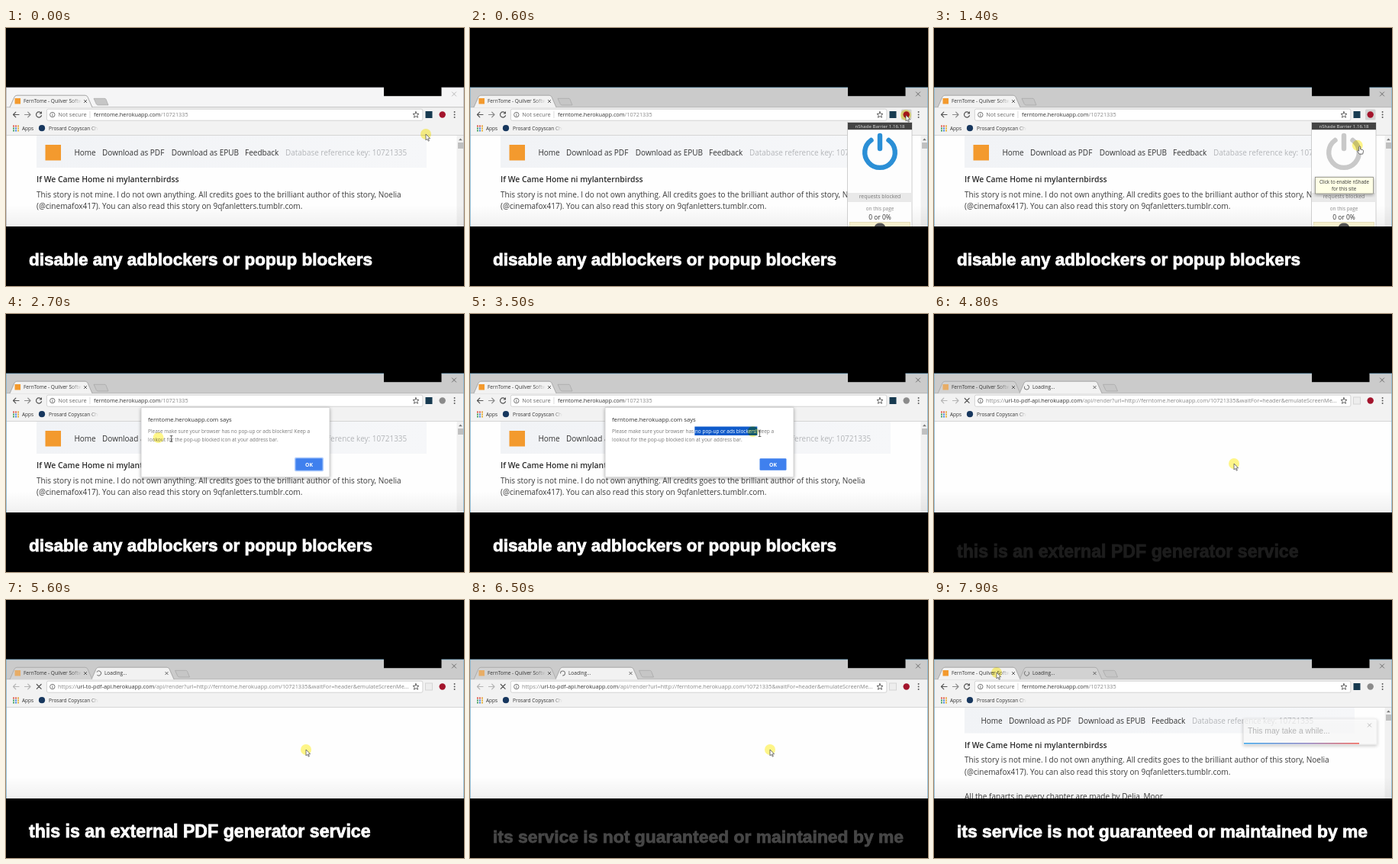
Write an HTML page that moves like this. It is 600 px wide and 338 px high and loops after 8 s.

```html
<!DOCTYPE html>
<html lang="en">
<head>
<meta charset="utf-8">
<style>
html, body { margin: 0; width: 100%; height: 100%; overflow: hidden; background: #000; }
svg { display: block; width: 100vw; height: 100vh; font-family: "Open Sans", "Noto Sans", sans-serif; white-space: pre; }
.caption { font-family: "Liberation Sans", Arial, sans-serif; font-weight: 700; fill: #fff; stroke: #fff; stroke-width: .8; }
.arial { font-family: "Liberation Sans", Arial, sans-serif; }
.line { fill: none; stroke-linecap: round; stroke-linejoin: round; }
#halo { mix-blend-mode: multiply; }
</style>
</head>
<body>
<svg id="stage" viewBox="0 0 600 338"></svg>
<script>
const LOOP = 8000;
const stage = document.getElementById('stage');

const text = (x, y, size, str, fill = '#333', extra = '') =>
  `<text x="${x}" y="${y}" font-size="${size}" fill="${fill}" ${extra}>${str}</text>`;
const rect = (x, y, w, h, fill, extra = '') =>
  `<rect x="${x}" y="${y}" width="${w}" height="${h}" fill="${fill}" ${extra}/>`;
const circle = (x, y, r, fill, extra = '') =>
  `<circle cx="${x}" cy="${y}" r="${r}" fill="${fill}" ${extra}/>`;
const line = (d, stroke, width = 1, extra = '') =>
  `<path class="line" d="${d}" stroke="${stroke}" stroke-width="${width}" ${extra}/>`;
const cross = (x, y, r, stroke, width = 1, extra = '') =>
  line(`M${x - r} ${y - r}L${x + r} ${y + r}M${x + r} ${y - r}L${x - r} ${y + r}`, stroke, width, extra);
const group = (id, body, extra = '') => `<g id="${id}" ${extra}>${body}</g>`;
const fade = (id, x1, x2, color) =>
  `<linearGradient id="${id}" gradientUnits="userSpaceOnUse" x1="${x1}" x2="${x2}" y1="0" y2="0">
    <stop stop-color="${color}"/><stop offset="1" stop-color="${color}" stop-opacity="0"/></linearGradient>`;

const site = 'ferntome.herokuapp.com';
const bookKey = '10721335';
const notice = 'Please make sure your browser has no pop-up or ads blockers! Keep a';
const selected = 'no pop-up or ads blockers!';

const defs = `<defs>
  ${fade('fadeTab', 84, 99, '#333')}${fade('fadeMark', 109, 121, '#333')}
  <linearGradient id="floor" x2="0" y2="1"><stop stop-opacity="0"/><stop offset="1" stop-opacity=".055"/></linearGradient>
  <linearGradient id="nav"><stop stop-color="#f1f3f6"/><stop offset="1" stop-color="#f6f7f9"/></linearGradient>
  <linearGradient id="bar"><stop stop-color="#2f9fe8"/><stop offset=".55" stop-color="#8a7fc0"/><stop offset="1" stop-color="#ee5a4f"/></linearGradient>
  <filter id="shadow" x="-10%" y="-10%" width="120%" height="130%"><feDropShadow dx="0" dy="1.5" stdDeviation="2" flood-opacity=".35"/></filter>
  <clipPath id="view">${rect(0, 141, 600, 119, '#fff')}</clipPath>
  <clipPath id="popClip">${rect(494, 123, 86, 137, '#fff')}</clipPath>
  <clipPath id="pick"><rect id="pickBox" y="147.5" height="11.5"/></clipPath>
</defs>`;

const tabShape = x =>
  `M${x} 104L${x + 6} 90.5Q${x + 7} 88.3 ${x + 9} 88.3H${x + 99}Q${x + 101} 88.3 ${x + 102} 90.5L${x + 108} 104`;
const tab = (id, x) => `<path id="${id}" d="${tabShape(x)}" stroke="#a5a5a5" stroke-width=".8"/>`;
const newTab = group('newTab',
  `<path d="M115 92.3H129Q130.5 92.3 131 93.5L134 101H120.5Q119 101 118.3 99.6Z" fill="#c6c6c6" stroke="#a5a5a5" stroke-width=".7"/>`);

const arrow = (id, tip, tail) => {
  const back = tail > tip ? 3.3 : -3.3;
  return `<path id="${id}" class="line" stroke-width="1.2" d="M${tail} 113.5H${tip}M${tip + back} 110.2L${tip} 113.5L${tip + back} 116.8"/>`;
};

const appDots = [...Array(9).keys()].map(i =>
  rect(9 + (i % 3) * 3, 127.5 + Math.floor(i / 3) * 3, 2, 2,
    ['#e05a4c', '#e05a4c', '#e8a33a', '#4ca564', '#4a86e0', '#e8b33a', '#4ca564', '#4a86e0', '#e8b33a'][i])).join('');

const chrome =
  rect(0, 78, 600, 182, '#fefefe') + rect(0, 78, 600, 26, '#cbcbcb', 'id="strip"') + rect(0, 104, 600, 37, '#f2f2f2') +
  rect(0, 103.4, 600, .8, '#b2b2b2') + rect(0, 140.2, 600, .8, '#cfcfcf') + newTab +
  tab('tabB', 112) + tab('tabA', 5) + `<use id="tabTop"/>` +
  rect(11.5, 92, 7.5, 7.5, '#f39a2e', 'id="favicon"') +
  text(23, 98.4, 6.5, 'FernTome - Quilver Softw', 'url(#fadeTab)') + cross(104, 96, 1.7, '#555', .9) +
  group('loadTab', text(129, 98.4, 6.5, 'Loading...') + cross(210.5, 96, 1.7, '#555', .9) +
    line('M0 -3A3 3 0 1 0 3 0', '#777', 1, 'id="spinner"')) +
  rect(495, 77, 75.5, 12.2, '#000') + cross(587, 86.5, 2.6, 'inherit', .8, 'id="close"') +
  arrow('back', 9.5, 17) + arrow('forward', 32, 24.5) +
  group('reload', line('M46 111.3A3.6 3.6 0 1 0 46.5 114.7', '#555', 1.2) + `<path d="M47 109V112.6H43.4Z" fill="#555"/>`) +
  group('stop', cross(43.2, 113.4, 2.9, '#555', 1.2)) +
  rect(53.4, 106.2, 492.5, 15, '#fff', 'rx="2" stroke="#cacaca" stroke-width=".8"') +
  circle(60.8, 113.6, 3.2, 'none', 'stroke="#666" stroke-width=".9"') + rect(60.4, 113.1, .9, 2.5, '#666') + rect(60.4, 111.6, .9, .9, '#666') +
  group('urlSite', text(68.2, 116.3, 7.45, 'Not secure', '#666') + rect(109.6, 109, .7, 9, '#ccc') +
    text(115, 116.3, 7.3, `${site}<tspan fill="#888">/${bookKey}</tspan>`)) +
  group('urlPdf', text(68, 116.3, 7.33,
    `https://<tspan fill="#333">url-to-pdf-api.herokuapp.com</tspan>/api/render?url=http://${site}/${bookKey}&amp;waitFor=header&amp;emulateScreenMe...`, '#888')) +
  `<path class="line" stroke="#555" stroke-width=".9" d="M537 109.6L538.1 112.3L541 112.5L538.8 114.4L539.5 117.3L537 115.7L534.5 117.3L535.2 114.4L533 112.5L535.9 112.3Z"/>` +
  `<rect id="extA" x="549.5" y="109" width="9" height="9"/>` +
  rect(565, 106.5, 13.5, 14, '#d3d3d3', 'id="extPress" rx="1.5"') + circle(571.7, 113.5, 4.2, '#a3142c', 'id="extB"') +
  [110, 113.5, 117].map(y => circle(587.6, y, .95, '#555')).join('') +
  appDots + text(21, 134, 6.5, 'Apps') + circle(47, 131.2, 4.1, '#17375e') +
  text(56, 134, 6.5, 'Prosard Copyscan Che', 'url(#fadeMark)');

const navLinks = [[89.4, 'Home'], [126, 'Download as PDF'], [216.8, 'Download as EPUB'], [313, 'Feedback']]
  .map(([x, label]) => text(x, 166.6, 10, label)).join('');
const page = group('page',
  `<rect id="navBar" x="40" y="141" width="511" fill="url(#nav)"/>` +
  group('logo', rect(51.5, 153, 20.5, 20.5, '#f39a2e')) +
  group('links', navLinks + text(366, 166.6, 9.95, `Database reference key: ${bookKey}`, '#b4b6b9')) +
  group('story',
    text(40, 202.3, 10.4, 'If We Came Home ni mylanternbirdss', '#2b2b2b', 'font-weight="600"') +
    text(40, 221.6, 10.05, 'This story is not mine. I do not own anything. All credits goes to the brilliant author of this story, Noelia', '#3a3a3a') +
    text(40, 237.4, 10.05, '(@cinemafox417). You can also read this story on 9qfanletters.tumblr.com.', '#3a3a3a') +
    text(40, 270, 10.05, 'All the fanarts in every chapter are made by Delia_Moor', '#3a3a3a')) +
  rect(590.5, 141, 9.5, 119, '#f1f1f1') + rect(592, 150, 7, 8, '#c0c0c0') +
  `<path d="M593 147.3L595.4 144.5L597.8 147.3Z" fill="#777"/>`, 'clip-path="url(#view)"');

const popup = group('popup',
  rect(494.5, 123.7, 84.5, 137, '#fdfdfd', 'stroke="#bbb" stroke-width=".7"') + rect(495, 124, 84, 9.2, '#444') +
  text(537, 130.9, 6.1, 'nShade Barrier 1.16.18', '#ddd', 'text-anchor="middle"') +
  group('power', line('M525.5 147A19.8 19.8 0 1 0 548.5 147', 'inherit', 6.4) + line('M537 141V158', 'inherit', 6.4)) +
  rect(495, 216, 84, 12, '#e9e9e9') +
  text(537, 223, 6.9, 'requests blocked', '#777', 'text-anchor="middle"') +
  text(537, 239, 6.4, 'on this page', '#888', 'text-anchor="middle"') +
  text(537, 250.6, 8.5, '0 or 0%', '#333', 'text-anchor="middle"') +
  rect(497.5, 254.5, 79, 6, '#f7f0cd', 'stroke="#d8cfa0" stroke-width=".6"') +
  `<path d="M530 260.5A7 5 0 0 1 544 260.5Z" fill="#555"/>` +
  group('tip', rect(499.5, 195.5, 76, 21.5, '#ffffe6', 'stroke="#8b8b80" stroke-width=".8" filter="url(#shadow)"') +
    text(537.5, 204.4, 6.2, 'Click to enable nShade', '#333', 'text-anchor="middle"') +
    text(537, 213, 6.2, 'for this site', '#333', 'text-anchor="middle"')), 'clip-path="url(#popClip)"');

const dialog = group('dialog',
  rect(177, 122.3, 247, 91.5, '#fff', 'rx="1" stroke="#bbb" stroke-width=".6" filter="url(#shadow)"') +
  text(186, 141, 7.7, `${site} says`) +
  text(186, 156, 6.5, notice, '#777', 'id="notice"') +
  text(186, 166.8, 6.5, 'lookout for the pop-up blocked icon at your address bar.', '#777') +
  group('picked', rect(186, 147, 230, 13, '#0f5bcb') + text(186, 156, 6.5, notice, '#fff'), 'clip-path="url(#pick)"') +
  rect(378, 187.8, 38, 18.4, '#a9c8fb', 'id="ring" rx="2"') + rect(379.5, 189.3, 35, 15.4, '#3f80ee', 'rx="1.2"') +
  text(397, 199.6, 6.8, 'OK', '#fff', 'text-anchor="middle" font-weight="700"'));

const toast = group('toast',
  rect(405.5, 156, 174.5, 33, '#fff', 'fill-opacity=".75" stroke="#e4e4e4" stroke-width=".8" filter="url(#shadow)"') +
  text(411, 175, 10.3, 'This may take a while...', '#aaa', 'class="arial"') +
  cross(570.5, 164, 2.2, '#aaa', .9) + rect(406, 187, 151, 1.8, 'url(#bar)'));

const frame = group('frame',
  rect(0, 77.6, 495, .8, 'inherit') + rect(570.5, 77.6, 29.5, .8, 'inherit') +
  rect(0, 78, .8, 182, 'inherit') + rect(599.2, 78, .8, 182, 'inherit')).replaceAll('fill="inherit"', '');

const pointers =
  circle(0, 0, 7, '#fff35c', 'id="halo" fill-opacity=".72"') +
  group('arrow', `<path d="M0 0V8L1.9 6.3L3.2 9.2L4.4 8.7L3.1 5.8H5.6Z" fill="#fff" stroke="#444" stroke-width=".7"/>`) +
  group('hand', `<path d="M-1 0Q0 -1.4 1 0V3.3L4.3 4.2Q5 4.6 4.8 6L4 9.5H-.5L-3.2 5.6Q-2.8 4.2 -1 5.6Z" fill="#fff" stroke="#333" stroke-width=".7"/>`) +
  group('beam', line('M-1.5 -1H1.5M0 -1V6.5M-1.5 6.5H1.5', '#444', .8));

const captions = [
  { str: 'disable any adblockers or popup blockers', size: 22.5, from: -1000, to: 4650 },
  { str: 'this is an external PDF generator service', size: 23.15, from: 4740, to: 6400 },
  { str: 'its service is not guaranteed or maintained by me', size: 22.9, from: 6350, to: LOOP }
];

stage.innerHTML = defs + rect(0, 0, 600, 338, '#000') + chrome + page +
  rect(0, 232, 600, 28, 'url(#floor)') + toast + popup + dialog + frame + pointers +
  captions.map((c, i) => text(30, 311.3, c.size, c.str, '#fff', `class="caption" id="caption${i}"`)).join('');

const el = id => document.getElementById(id);
const set = (id, attrs) => { for (const k in attrs) el(id).setAttribute(k, attrs[k]); };
const show = (id, on) => { el(id).style.display = on ? '' : 'none'; };
const clamp = v => Math.min(1, Math.max(0, v));
const within = (t, a, b) => t >= a && t < b;

// Pointer route: time, x, y
const route = [
  [0, 550, 139], [400, 571, 114], [800, 571, 114], [1100, 545, 148], [1500, 560, 157], [1700, 560, 157],
  [2300, 186, 162], [2550, 188, 163], [3000, 297, 154], [3600, 386, 154], [3900, 387, 156],
  [4400, 393, 196], [6700, 393, 196], [7200, 82, 95], [LOOP, 82, 95]
];
function pointerAt(t) {
  t = Math.max(0, t);
  const i = Math.max(1, route.findIndex(p => p[0] >= t));
  const [a, b] = [route[i - 1], route[i]];
  const p = clamp((t - a[0]) / (b[0] - a[0]));
  const e = p * p * (3 - 2 * p);
  return [a[1] + (b[1] - a[1]) * e, a[2] + (b[2] - a[2]) * e];
}

function render(t) {
  const focused = t >= 500;
  const loading = within(t, 4500, 7500);
  const twoTabs = t >= 4500;
  const returned = t >= 7500;
  const muted = within(t, 1900, 4500) || returned;
  const popped = within(t, 600, 1850);

  set('strip', { fill: focused ? '#cbcbcb' : '#f5f5f6' });
  set('close', { stroke: focused ? '#555' : '#aaa' });
  set('frame', { fill: focused ? '#7fb2d0' : '#b4b4b8' });
  show('tabB', twoTabs);
  show('loadTab', twoTabs);
  set('newTab', { transform: `translate(${twoTabs ? 106.5 : 0} 0)` });
  set('tabA', { fill: loading ? (t > 7100 ? '#dedede' : '#d2d2d2') : '#f2f2f2' });
  set('tabB', { fill: loading ? '#f2f2f2' : '#d2d2d2' });
  set('tabTop', { href: loading ? '#tabB' : '#tabA' });
  set('favicon', { opacity: loading ? .65 : 1 });
  set('spinner', { transform: `translate(121.5 96) rotate(${t * .36})` });

  set('back', { stroke: loading ? '#b5b5b5' : '#555' });
  set('forward', { stroke: loading ? '#b5b5b5' : '#8a8a8a' });
  show('reload', !loading);
  show('stop', loading);
  show('urlSite', !loading);
  show('urlPdf', loading);
  set('extA', { fill: loading ? '#ededed' : '#173a50', stroke: loading ? '#d5d5d5' : 'none' });
  set('extB', { fill: muted ? '#8b8b8b' : '#a3142c' });
  show('extPress', popped);

  show('page', !loading);
  show('logo', !returned);
  set('navBar', { height: returned ? 33.5 : 42 });
  set('links', { transform: returned ? 'translate(-28 -4.6)' : '' });
  set('story', { transform: returned ? 'translate(0 -8.6)' : '' });
  show('toast', returned);
  set('toast', { opacity: .85 * clamp((t - 7550) / 300) });

  show('popup', popped);
  set('power', { stroke: t < 1200 ? '#2b8fd6' : '#c9c9c9' });
  show('tip', t >= 1300);

  show('dialog', within(t, 2500, 4400));
  show('ring', t < 3050);
  const [x, y] = pointerAt(t);
  const end = t < 3000 ? pick.from : t < 3600 ? Math.min(pick.to, Math.max(pick.from, x)) : pick.to;
  set('pickBox', { x: pick.from, width: end - pick.from });

  const hand = within(t, 1050, 1750) || within(t, 2250, 2500);
  const beam = within(t, 2500, 4050);
  show('hand', hand);
  show('beam', beam);
  show('arrow', !hand && !beam);
  for (const id of ['hand', 'beam', 'arrow']) set(id, { transform: `translate(${x} ${y})` });
  const [hx, hy] = pointerAt(t - 60);
  set('halo', { cx: hx, cy: hy });

  // Captions rise while they fade in
  captions.forEach((c, i) => {
    const p = clamp((t - c.from) / 550);
    set('caption' + i, { opacity: t < c.to ? p : 0, transform: `translate(0 ${9 * (1 - p)})` });
  });
}

const pick = { from: 297, to: 386 };
function measure() {
  const start = notice.indexOf(selected);
  const node = el('notice');
  pick.from = node.getStartPositionOfChar(start).x - .5;
  pick.to = node.getEndPositionOfChar(start + selected.length - 1).x + .5;
}

measure();
const began = performance.now();
function tick() {
  render((performance.now() - began) % LOOP);
  requestAnimationFrame(tick);
}
tick();
</script>
</body>
</html>
```
